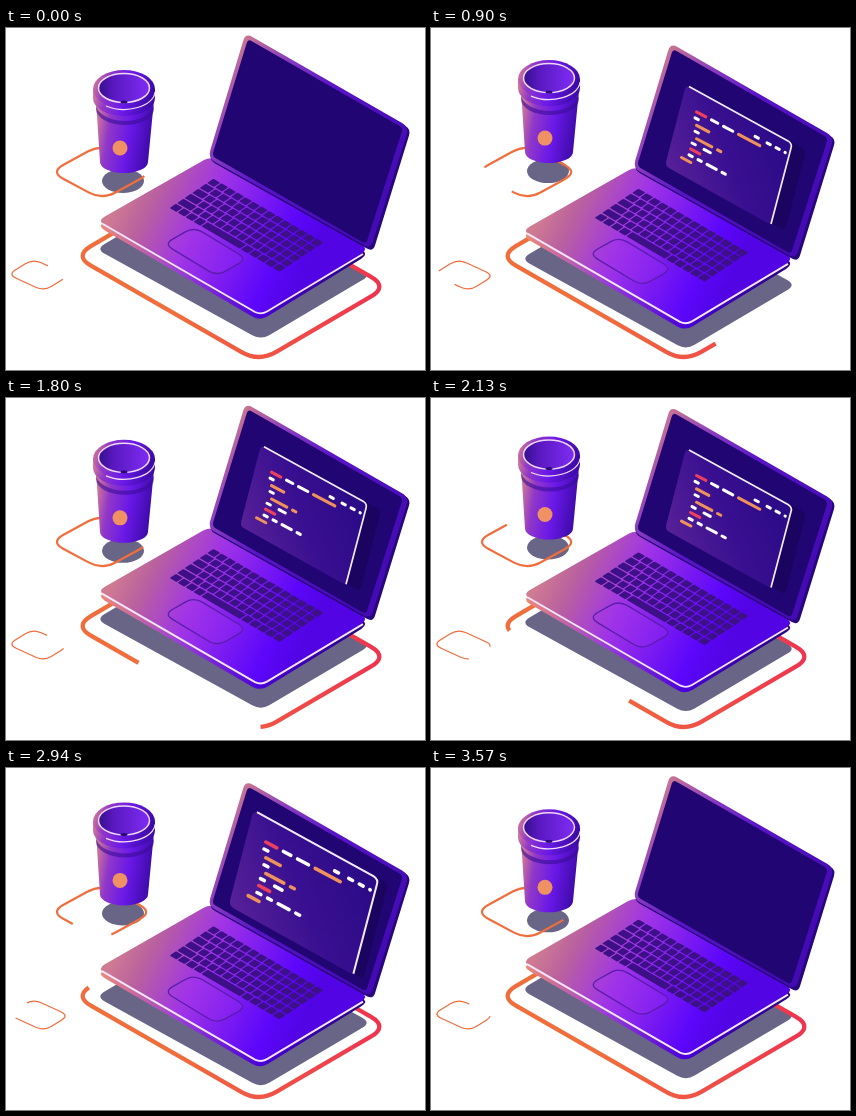
Write an HTML page that moves like this. It is 419 by 342 pixels and loops after 3.63 s.

```html
<!DOCTYPE html>
<html lang="en">
<head>
<meta charset="utf-8">
<title>Laptop and cup</title>
<style>
  html, body { margin: 0; width: 100%; height: 100%; overflow: hidden; background: #fff; }
  svg { display: block; }
  .line { fill: none; stroke: url(#warm); stroke-dasharray: 80 20; }
</style>
</head>
<body>
<svg width="419" height="342" viewBox="0 0 419 342">
  <defs>
    <linearGradient id="warm" gradientUnits="userSpaceOnUse" x1="170" y1="0" x2="376" y2="0">
      <stop stop-color="#f06d3c"/><stop offset="1" stop-color="#ee3350"/>
    </linearGradient>
    <linearGradient id="deck" gradientUnits="userSpaceOnUse" x1="110" y1="175" x2="290" y2="262">
      <stop stop-color="#cf7b92"/><stop offset=".16" stop-color="#b9609f"/>
      <stop offset=".42" stop-color="#a034e6"/><stop offset=".85" stop-color="#5c06fb"/>
      <stop offset="1" stop-color="#5204e4"/>
    </linearGradient>
    <linearGradient id="side" gradientUnits="userSpaceOnUse" x1="95" y1="0" x2="360" y2="0">
      <stop stop-color="#ec8a78"/><stop offset=".3" stop-color="#9a3cd8"/>
      <stop offset=".6" stop-color="#4a00d8"/><stop offset="1" stop-color="#27047c"/>
    </linearGradient>
    <linearGradient id="bezel" gradientUnits="userSpaceOnUse" x1="215" y1="30" x2="380" y2="160">
      <stop stop-color="#d07c8c"/><stop offset=".25" stop-color="#8a3cc0"/>
      <stop offset=".5" stop-color="#5a14c8"/><stop offset="1" stop-color="#440bb4"/>
    </linearGradient>
    <linearGradient id="sheet" x1="0" y1=".7" x2="1" y2=".3">
      <stop stop-color="#5a2299"/><stop offset=".5" stop-color="#380f90"/><stop offset="1" stop-color="#290a85"/>
    </linearGradient>
    <linearGradient id="cup" x1="0" y1=".2" x2="1" y2=".4">
      <stop stop-color="#d87f92"/><stop offset=".25" stop-color="#9038c8"/>
      <stop offset=".6" stop-color="#6a18e8"/><stop offset="1" stop-color="#3c0aa6"/>
    </linearGradient>
    <linearGradient id="inside">
      <stop stop-color="#35108c"/><stop offset=".3" stop-color="#5a18c0"/><stop offset="1" stop-color="#7e2cf4"/>
    </linearGradient>
  </defs>

  <path class="laptop" data-pts="90,221 255,312 365,247" data-r="10" fill="#686586"/>
  <ellipse class="cup" cx="117" cy="153" rx="21" ry="12" fill="#686586"/>

  <path class="line" data-pts="382,258.6 253,334 68,228" data-r="20" data-start="-11.4" data-turns="1" stroke-width="4.3"/>
  <path class="line" data-pts="44.4,144 96.3,171.7 146.8,144" data-r="15" data-start="-37" data-turns="2" stroke-width="2.2"/>
  <path class="line" data-pts="63,247.5 38,263 2,246.5" data-r="9" data-start="-1.3" data-turns="2" stroke-width="1.3"/>

  <g class="cup">
    <path d="M90 72L94 134A24 11 0 0 0 142 134L148 72Z" fill="url(#cup)"/>
    <path d="M90 76A29 17 0 0 0 148 76V81A29 16 0 0 1 90 81Z" fill="#3a0c98" opacity=".6"/>
    <path d="M87 61V70A31 18 0 0 0 149 70V61Z" fill="url(#cup)"/>
    <ellipse cx="118" cy="61" rx="31" ry="19" fill="url(#cup)"/>
    <ellipse cx="118" cy="60" rx="25.500" ry="14.500" fill="url(#inside)" stroke="#efd8f5" stroke-width="1.500"/>
    <path d="M100 78A31 18 0 0 0 149 64" fill="none" stroke="#f3dcf6" stroke-width="1.200"/>
    <ellipse cx="118" cy="74" rx="3.500" ry="1.500" fill="#2b0a78"/>
    <circle cx="114" cy="120" r="7.500" fill="#ef9162"/>
  </g>

  <g class="laptop">
    <path data-pts="91,198 205,133 363,226 254,293" data-r="9" fill="url(#side)"/>
    <path data-pts="91,193 205,128 363,221 255,287" data-r="9" fill="url(#deck)"/>
    <path d="M96 195.500L249 284Q255 287 261 283.500L357 226" fill="none" stroke="#f6e6ff" stroke-width="1.900"/>
    <path id="keys" fill="#3d1088"/>
    <path data-pts="158,216 211,248 241,231" data-r="10" fill="#a030f0" fill-opacity=".25" stroke="#5a1cac" stroke-width="1.300"/>

    <path data-pts="241,7 405,101 367,224 203,132" data-r="7" fill="#28077c"/>
    <path data-pts="239.500,5 403,99 364.500,221 202,130" data-r="8" fill="url(#bezel)"/>
    <path data-pts="242,11 397,100 360,216 206,128" data-r="4" fill="#210673"/>
    <g id="panel">
      <path id="shade" data-pts="255,47 234,128 340,187" data-r="5" fill="#170459" opacity=".7"/>
      <path data-pts="255,47 234,128 340,187" data-r="5" fill="url(#sheet)"/>
      <path d="M258 48.500L357 103Q361.500 106 360 110L340 186" fill="none" stroke="#f4eaff" stroke-width="1.700"/>
      <g id="code" fill="none" stroke-width="3" stroke-linecap="round"/>
    </g>
  </g>
</svg>
<script>
const LOOP = 3630, STEP = 30, BOB = 10;
const all = selector => [...document.querySelectorAll(selector)];
const byId = id => document.getElementById(id);
const clamp = x => Math.max(0, Math.min(1, x));

// Closed polygon with softened corners, starting just after its first corner.
function rounded(points, radius) {
  const toward = (a, b) => {
    const k = radius / Math.hypot(b[0] - a[0], b[1] - a[1]);
    return [a[0] + (b[0] - a[0]) * k, a[1] + (b[1] - a[1]) * k];
  };
  const n = points.length;
  let d = 'M' + toward(points[0], points[1]);
  for (let i = 1; i <= n; i++) {
    const p = points[i % n];
    d += `L${toward(p, points[i - 1])}Q${p} ${toward(p, points[(i + 1) % n])}`;
  }
  return d + 'Z';
}

// Three points stand for a parallelogram.
for (const path of all('[data-pts]')) {
  const points = path.dataset.pts.split(' ').map(p => p.split(',').map(Number));
  const [a, b, c] = points;
  if (points.length === 3) points.push([a[0] + c[0] - b[0], a[1] + c[1] - b[1]]);
  path.setAttribute('d', rounded(points, +path.dataset.r));
}

// Keyboard: u runs along a row, v runs from the back row to the front.
const ROWS = 6, COLS = 14;
const onDeck = (u, v) => [207.5 + 111 * u - 45 * v, 150 + 64.5 * u + 30 * v];
function key(row, from, to) {
  const stagger = .016 * (row % (ROWS - 1));
  const edge = col => col ? col / COLS + stagger * (1 - col / COLS) : 0;
  const left = edge(from) + .005, right = edge(to) - .005;
  const back = row / ROWS + .013, front = (row + 1) / ROWS - .013;
  return rounded([onDeck(left, back), onDeck(right, back), onDeck(right, front), onDeck(left, front)], 1);
}
let keys = '';
for (let row = 0; row < ROWS; row++) {
  for (let col = 0; col < COLS; col++) {
    const width = row === ROWS - 1 && col === 4 ? 5 : 1;
    keys += key(row, col, col + width);
    col += width - 1;
  }
}
byId('keys').setAttribute('d', keys);

// Each run of a letter is one stroke of code: red, white or orange.
const ink = { r: '#ef415c', w: '#fff', o: '#f0935a' };
const listing = [
  '                    ww  ww ww w',
  ' rrrr www wwww oooooooo',
  ' ww',
  '  ooooo',
  '  ww',
  '   oooooo oo',
  '  ww  www',
  '  rrrr',
  '  ww ww wwww ww',
  'oooo'
];
listing.forEach((text, row) => {
  for (const { 0: run, index } of text.matchAll(/r+|w+|o+/g)) {
    const x = 264 - 1.5 * row + 3 * index, y = 66.5 + 5.9 * row + 1.6 * index;
    const length = run.length - .9;
    byId('code').innerHTML += `<path stroke="${ink[run[0]]}" d="M${x} ${y}l${3 * length} ${1.6 * length}"/>`;
  }
});

const lines = all('.line'), laptop = all('.laptop'), cup = all('.cup'), panel = byId('panel');
lines.forEach(line => line.setAttribute('pathLength', 100));

function draw(now) {
  const t = Math.min(Math.floor(now % LOOP / STEP) * STEP, LOOP - 2 * STEP);
  const phase = t / LOOP;
  const bob = BOB * (1 - Math.abs(1 - (phase * 4) % 2));

  laptop.forEach(el => el.setAttribute('transform', `translate(0 ${bob})`));
  cup.forEach(el => el.setAttribute('transform', `translate(0 ${-bob})`));
  for (const line of lines) {
    const { start, turns } = line.dataset;
    line.setAttribute('stroke-dashoffset', -(+start + 100 * turns * phase));
  }

  // The panel rises off the screen, then sinks back to fill it.
  const lift = clamp((t - 570) / 300) - clamp((t - 2820) / 300);
  panel.setAttribute('transform', `translate(298 117) scale(${1.44 - .44 * lift}) translate(-298 -117)`);
  panel.setAttribute('opacity', clamp(lift * 2));
  byId('shade').setAttribute('transform', `translate(${14 * lift} ${6 * lift})`);
}

function tick(now) {
  draw(now);
  requestAnimationFrame(tick);
}
draw(0);
requestAnimationFrame(tick);
</script>
</body>
</html>
```
